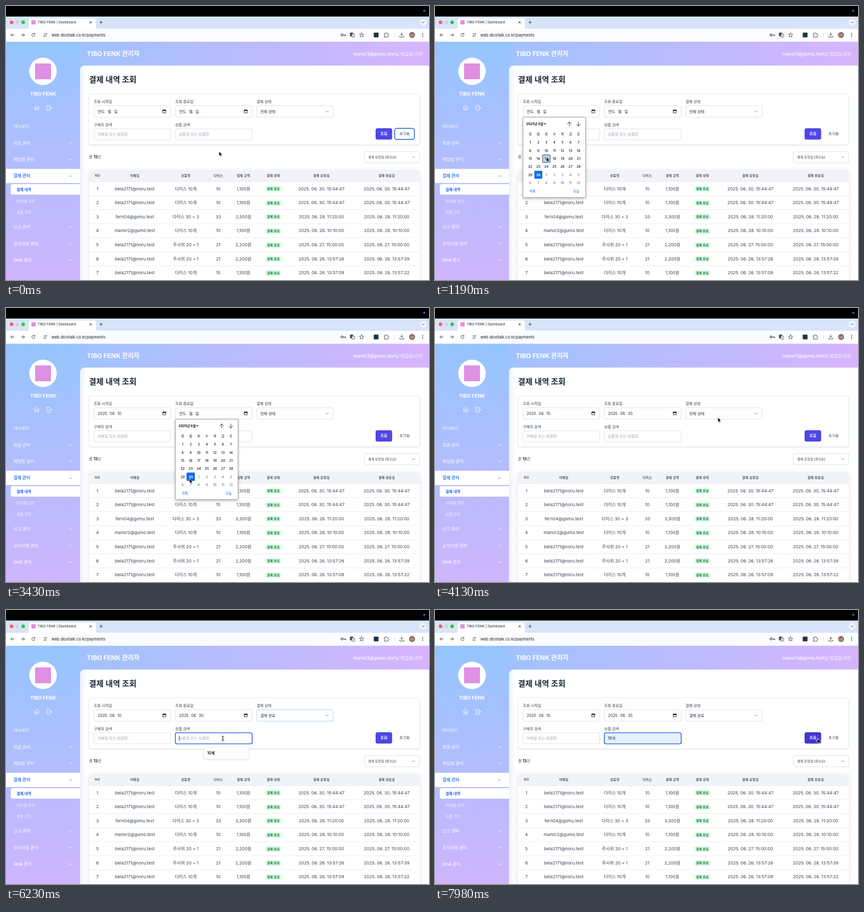
Recreate the animation shown at these times as an HTML page. Size 800x520 px, loop 8 s.

```html
<!DOCTYPE html>
<html lang="ko">
<head>
<meta charset="utf-8">
<title>Payments dashboard</title>
<style>
html, body { margin: 0; width: 100%; height: 100%; overflow: hidden; background: #fff; }
svg { display: block; width: 100vw; height: 100vh; }
text { font-family: Inter, 'Noto Sans CJK KR', 'Noto Sans CJK', sans-serif; white-space: pre; }
</style>
</head>
<body>
<svg id="stage" viewBox="0 0 800 520">
  <defs>
    <linearGradient id="top"><stop stop-color="#95c5fe"/><stop offset="1" stop-color="#d7b4fe"/></linearGradient>
    <linearGradient id="side" x2="0" y2="1"><stop stop-color="#95c5fe"/><stop offset="1" stop-color="#cfb5fe"/></linearGradient>
    <linearGradient id="edge"><stop stop-color="#edf1f8"/><stop offset="1" stop-color="#fff"/></linearGradient>
    <filter id="soft" x="-20%" y="-20%" width="140%" height="140%">
      <feDropShadow dx="0" dy="1" stdDeviation="1.2" flood-opacity=".14"/>
    </filter>
    <filter id="deep" x="-20%" y="-20%" width="140%" height="140%">
      <feDropShadow dx="0" dy="2" stdDeviation="2.5" flood-opacity=".28"/>
    </filter>
    <filter id="halo" x="-5%" y="-10%" width="110%" height="120%">
      <feDropShadow dx="0" dy="3" stdDeviation="4" flood-color="#334" flood-opacity=".12"/>
    </filter>
  </defs>
</svg>
<script>
const LOOP = 8000, STEP = 70;
const BRAND = 'TIBO FENK';
const INK = '#1f2937', BODY = '#374151', LINE = '#d1d5db', BLUE = '#2563eb';
const stage = document.getElementById('stage');

// Markup helpers; text is centred vertically on y
const attrs = o => Object.entries(o).map(([k, v]) => ` ${k}="${v}"`).join('');
const rect = (x, y, w, h, fill, o = {}) =>
  `<rect x="${x}" y="${y}" width="${w}" height="${h}" fill="${fill}"${attrs(o)}/>`;
const dot = (x, y, r, fill, o = {}) => `<circle cx="${x}" cy="${y}" r="${r}" fill="${fill}"${attrs(o)}/>`;
const path = (d, stroke, width = 1, o = {}) =>
  `<path d="${d}" fill="none" stroke="${stroke}" stroke-width="${width}" stroke-linecap="round" stroke-linejoin="round"${attrs(o)}/>`;
const text = (x, y, size, str, fill = BODY, weight = 400, o = {}) =>
  `<text x="${x}" y="${(y + size * .36).toFixed(2)}" font-size="${size}" fill="${fill}" font-weight="${weight}"${attrs(o)}>${str}</text>`;
const MID = { 'text-anchor': 'middle' };
const mid = (x, y, size, str, fill, weight, o = {}) => text(x, y, size, str, fill, weight, { ...MID, ...o });
const group = (id, body, o = {}) => `<g id="${id}"${attrs(o)}>${body}</g>`;
const chevron = (x, y, color, up = 1, s = 2.3) =>
  path(`M${x - s} ${y - up * s / 2}l${s} ${up * s}l${s} ${-up * s}`, color, .9);
const field = (x, y, w, h, o = {}) => rect(x, y, w, h, '#fff', { rx: 3, stroke: LINE, 'stroke-width': .7, ...o });

function browser() {
  const gray = '#474a4d';
  return rect(0, 0, 800, 20, '#000') + dot(791, 9, 2, '#5a4fe0') +
    rect(0, 20, 800, 24, '#d8e4fa') +
    dot(10.5, 31, 3.4, '#ff5f57') + dot(21.5, 31, 3.4, '#cfd2d8') + dot(32.5, 31, 3.4, '#2bc840') +
    `<path d="M39 43.5q4 0 4-4v-12q0-4 4-4h119q4 0 4 4v12q0 4 4 4z" fill="#fff"/>` +
    rect(48, 27, 8, 8, '#df90e2') +
    text(60, 31, 6.4, BRAND + ' | Dashboard', '#1f1f1f') +
    path('M158.2 29.2l3.8 3.8m0-3.8l-3.8 3.8', '#222', .9) +
    path('M177 31h5.6M179.8 28.2v5.6', '#333', .9) +
    dot(789, 31, 6.5, '#f1f5fd') + chevron(789, 31, '#333') +
    rect(0, 43.3, 800, 24.7, '#fff') + rect(67, 46, 613, 18, '#fafbfe', { rx: 9 }) +
    path('M15.4 55h-6m2.6-2.7l-2.7 2.7l2.7 2.7', gray, 1) +
    path('M29 55h6m-2.6-2.7l2.7 2.7l-2.7 2.7', gray, 1) +
    path('M54.3 53a3 3 0 1 0 .5 3M54.8 51.8v1.9h-1.9', gray, 1) +
    dot(74.5, 55, 6, '#fff') +
    path('M71.5 53h2.2M77 57h-2', gray, .9) +
    dot(76, 53, 1.1, 'none', { stroke: gray, 'stroke-width': .9 }) + dot(72.7, 57, 1.1, 'none', { stroke: gray, 'stroke-width': .9 }) +
    text(86, 55, 7.5, 'web.dicetalk.co.kr/payments', '#202124') +
    dot(635.4, 55, 1.9, 'none', { stroke: gray, 'stroke-width': 1.2 }) + path('M637.5 55h5v1.4m-1.9-1.2v1', gray, 1.2) +
    rect(650.5, 50.5, 6, 7, gray, { rx: 1 }) + rect(654, 53, 5.5, 6.5, '#fff', { rx: 1, stroke: gray, 'stroke-width': .7 }) +
    mid(656.8, 56.3, 4, '文', gray) +
    path('M672.5 50.8l1.2 2.7l2.9.3l-2.2 1.9l.7 2.9l-2.6-1.5l-2.6 1.5l.7-2.9l-2.2-1.9l2.9-.3z', gray, .9) +
    rect(695.5, 50.5, 9, 9, '#1d3440', { rx: 1 }) +
    path('M715.7 52.3h2.1q0-1.6 1.4-1.6t1.4 1.6h2v2.4q1.3 0 1.3 1.2t-1.3 1.2v2h-6.9v-2q1.5 0 1.5-1.3t-1.5-1.3z', gray, .95) +
    path('M735 51v8', '#c9d6ee', .8) +
    path('M748.5 50.8v5m-2.3-2.2l2.3 2.3l2.3-2.3M744.7 57v1.9h7.6V57', gray, 1) +
    dot(768, 55, 5.7, '#8d6a60') + mid(768, 55, 4.3, '나루', '#fff') +
    [52, 55, 58].map(y => dot(788, y, .9, gray)).join('') +
    rect(0, 67.3, 800, .7, '#e6eaf2');
}

function sidebar() {
  const items = [['대시보드', 228.5], ['회원 관리', 260], ['채팅방 관리', 291], ['신고 관리', 419.5], ['공지사항 관리', 451], ['QnA 관리', 482.5]];
  return rect(0, 68, 800, 90, 'url(#top)') + rect(0, 68, 140, 452, 'url(#side)') +
    text(153, 90.5, 12, BRAND + ' 관리자', '#fff', 700) +
    text(787, 90.5, 8.4, 'manor3@gomu.test님 반갑습니다!', '#fff', 500, { 'text-anchor': 'end' }) +
    dot(70, 124, 26, '#fff') + rect(55, 109, 30, 30, '#df90e2') +
    mid(70, 167, 9.3, BRAND, '#fff', 700) +
    path('M53.3 193l4.7-4.6l4.7 4.6M54.5 192v5.2h2.4v-3.4h2.2v3.4h2.4V192', '#fff', .85) +
    path('M83.3 190.6v-2h-6v9.2h6v-2M80.5 193.2h6m-2-2l2 2l-2 2', '#fff', .85) +
    items.map(([s, y], i) => text(14, y, 8.2, s, '#fff', 500) + (i ? chevron(122, y, '#fff') : '')).join('') +
    rect(0, 309, 140, 27, '#fff') + text(14, 322.5, 8.2, '결제 관리', '#3b82f6', 700) + chevron(122, 322.8, '#3b82f6', -1) +
    rect(9, 338, 134, 20, '#fff', { rx: 3.5 }) + text(20, 348, 7.1, '결제 내역', BLUE, 700) +
    text(20, 370, 7.1, '아이템 관리', '#f5f3ff') + text(20, 391.5, 7.1, '상품 관리', '#f5f3ff');
}

function filters() {
  const label = (x, y, s) => text(x, y, 7.1, s, BODY, 500);
  const dateBox = (x, id) => field(x, 189.3, 145.3, 21.7) +
    `<g id="${id}"></g>` +
    rect(x + 130.3, 197.6, 5.6, 5.2, 'none', { stroke: '#111', 'stroke-width': .8 }) +
    rect(x + 129.9, 197.2, 6.4, 1.9, '#111') + path(`M${x + 131.4} 196.6v.6m3.4-.6v.6`, '#111', .7);
  return '<path d="M140 520V123q0-10 10-10h650v407z" fill="#fff"/>' +
    '<path d="M140 520V123q0-10 10-10h2v407z" fill="url(#edge)"/>' +
    text(157, 140, 15, '결제 내역 조회', INK, 700) +
    rect(157, 167, 625.5, 96, '#fff', { rx: 4, stroke: '#e5e7eb', 'stroke-width': .7, filter: 'url(#soft)' }) +
    label(166, 181.5, '조회 시작일') + label(320, 181.5, '조회 종료일') + label(474, 181.5, '결제 상태') +
    label(166, 225.5, '구매자 검색') + label(320, 225.5, '상품 검색') +
    dateBox(166.3, 'from') + dateBox(320.3, 'to') +
    field(474.3, 189.3, 144.4, 21.7, { id: 'status' }) + '<g id="statusText"></g>' + chevron(607.5, 200.2, '#6b7280') +
    field(166.3, 233, 145.3, 21) + text(173, 243.5, 7.2, '이메일 또는 회원ID', '#9ca3af') +
    field(320.3, 233, 145.3, 21, { id: 'product' }) + '<g id="productText"></g>' +
    rect(327.2, 238.7, .7, 9.6, '#111', { id: 'caret' }) +
    rect(699, 232, 31.3, 21.6, '#4f46e5', { rx: 3.5, id: 'search' }) + mid(714.6, 242.7, 7.1, '조회', '#fff', 600) +
    rect(735.2, 232.3, 37.2, 21, '#fff', { rx: 3.5, stroke: '#1967c9', 'stroke-width': 1.5, id: 'resetRing' }) +
    mid(753.8, 242.7, 7.1, '초기화', BODY, 500) +
    text(157, 286.7, 7.2, '총 <tspan font-weight="700" fill="#111827">13</tspan>건') +
    field(678, 276.2, 104.2, 21.4) + text(685, 287, 6.2, '결제 요청일 (최신순)', BODY, 500) + chevron(771, 287, '#6b7280');
}

function table() {
  const cols = [173, 243.5, 340, 401.5, 449, 505.5, 596.5, 720];
  const heads = ['NO', '이메일', '상품명', '다이스', '결제 금액', '결제 상태', '결제 요청일', '결제 완료일'];
  const mail = 'bela2171@noru.test', ten = ['다이스 10개', 10, '1,100원'], twenty = ['주사위 20 + 1', 21, '2,200원'];
  const rows = [
    [mail, ten, '30. 15:44:47'], [mail, ten, '30. 15:44:47'],
    ['fern04@gomu.test', ['다이스 30 + 3', 33, '3,300원'], '28. 11:20:00'],
    ['manor2@gumo.test', ten, '28. 10:10:00'], [mail, twenty, '27. 15:00:00'],
    [mail, twenty, '26. 13:57:26', '26. 13:57:39'], [mail, ten, '26. 13:57:09', '26. 13:57:22']
  ];
  return rect(157, 311, 625.5, 230, '#fff', { rx: 5, filter: 'url(#halo)' }) +
    '<path d="M157 333v-17q0-5 5-5h615.500q5 0 5 5v17z" fill="#f2f3f7"/>' +
    heads.map((s, i) => mid(cols[i], 322, 6.1, s, '#4b5563', 600, { 'letter-spacing': .25 })).join('') +
    rows.map(([who, item, asked, done = asked], n) => {
      const y = 346.6 + n * 26.63;
      const cells = [n + 1, who, ...item, null, '2025. 06. ' + asked, '2025. 06. ' + done];
      return rect(157, y - 13.6, 625.5, .7, '#e5e7eb') +
        rect(489.2, y - 4.9, 32.8, 10.6, '#dcfce7', { rx: 5.3 }) +
        cells.map((s, i) => i === 5
          ? mid(505.6, y + .4, 6.2, '결제 완료', '#15803d', 600)
          : mid(cols[i], y, 8.2, s)).join('');
    }).join('');
}

function calendar() {
  const X = i => 13.8 + i * 15.25, Y = r => 259.2 + r * 15.27;
  let days = '';
  for (let n = 0; n < 42; n++) {
    const day = n % 30 + 1, today = n === 29;
    const x = X(n % 7), y = Y(Math.floor(n / 7));
    if (today) days += rect(x - 7.5, y - 7.5, 15, 15, '#0b6cf0', { rx: 1 });
    days += mid(x, y, 6.3, day, today ? '#fff' : n < 30 ? '#111' : '#757575', today ? 700 : 500);
  }
  return rect(0, 211, 118.6, 152.6, '#fff', { rx: 2, stroke: '#777', 'stroke-width': .7, filter: 'url(#deep)' }) +
    text(6, 223.5, 6.2, '2025년 6월', '#111', 700) + '<path d="M39.300 222.500h4.400l-2.200 2.600z" fill="#111"/>' +
    path('M87.700 228v-8m-3.700 3.700l3.700-3.700l3.700 3.700M105 220v8m-3.700-3.700l3.700 3.700l3.700-3.700', '#222', .9) +
    [...'일월화수목금토'].map((s, i) => mid(X(i), 243.3, 6, s, '#111', 500)).join('') +
    rect(0, 0, 14.6, 14.6, '#bcd0f3', { id: 'dayHover', rx: 1, stroke: '#24364f', 'stroke-width': .9 }) + days +
    text(12, 352, 6.3, '삭제', '#1266e3', 500) + text(95, 352, 6.3, '오늘', '#1266e3', 500);
}

function popups() {
  const options = ['전체 상태', '결제 완료', '결제 실패', '결제 취소', '환불 완료', '결제 대기'];
  return group('calendar', calendar()) +
    group('menu', rect(474, 213.5, 146, 109.5, '#fff', { rx: 3.5, stroke: '#e2e4e9', 'stroke-width': .6, filter: 'url(#deep)' }) +
      rect(476.5, 0, 141, 17.2, '#f3f4f6', { id: 'menuHover', rx: 2 }) +
      path('M482 224.800l1.800 1.900l4-4.300', '#111', .9) +
      options.map((s, i) => text(494, 224.7 + i * 17.35, 7.2, s, INK, 500)).join('')) +
    group('hint', rect(373.4, 260.8, 86, 22.2, '#fff', { rx: 3, stroke: '#dadce0', 'stroke-width': .5, filter: 'url(#soft)' }) +
      rect(374, 263, 84.8, 17.5, '#eceef1', { id: 'hintHover' }) + text(380.5, 271, 7, '10개', '#111', 600));
}

function cursors() {
  const arrow = '<path d="M0 0v8.800l2-1.900l1.400 3.200l1.500-.7l-1.400-3.100h2.800z" fill="#000" stroke="#fff" stroke-width=".7"/>';
  const beam = path('M-1.800-4.500q1.800 0 1.800 1.200v6.600q0 1.200-1.800 1.200M1.800-4.500q-1.800 0-1.800 1.200m0 6.600q0 1.200 1.800 1.200M-1 .8h2', '#111', .9);
  const hand = '<path d="M-.8 0q.8-.9 1.600 0v3.400l3 .7q1 .3.900 1.400l-.5 3.300h-4.600l-2.300-3.400q-.2-1.100.8-.9l1.100 1z" fill="#111" stroke="#fff" stroke-width=".7"/>';
  return group('pointer', group('arrow', arrow) + group('beam', beam) + group('hand', hand));
}

stage.insertAdjacentHTML('beforeend',
  browser() + sidebar() + filters() + table() + popups() + cursors());

const el = {};
stage.querySelectorAll('[id]').forEach(n => el[n.id] = n);
const show = (id, on) => el[id].setAttribute('visibility', on ? 'inherit' : 'hidden');
const set = (id, o) => { for (const k in o) el[id].setAttribute(k, o[k]); };
const clamp = v => Math.max(0, Math.min(1, v));
const mix = (a, b, k) => `rgb(${a.map((v, i) => Math.round(v + (b[i] - v) * k))})`;

// Moves: start time, end time, x, y
const moves = [
  [70, 560, 299, 200], [700, 1190, 211, 287], [1260, 1400, 210, 275],
  [1540, 2450, 453, 200], [2660, 3360, 347, 324], [3710, 4200, 546, 201],
  [4400, 5040, 528, 241], [5460, 6020, 410, 244], [6370, 6790, 392, 271],
  [7280, 7700, 722, 243], [7840, 7980, 724, 243]
];
const CLICK = { open1: 630, pick1: 1470, open2: 2520, pick2: 3570, menu: 4270, option: 5320, focus: 6160, fill: 7140 };

function pointerAt(t) {
  let x = 403, y = 276;
  for (const [a, b, tx, ty] of moves) {
    if (t < a) break;
    const k = clamp((t - a) / (b - a)), e = k * k * (3 - 2 * k);
    x += (tx - x) * e;
    y += (ty - y) * e;
  }
  return [x, y];
}

function draw(t) {
  const c = CLICK, [x, y] = pointerAt(t);
  const within = (a, b) => t >= a && t < b;
  const inside = (l, top, r, b) => x > l && x < r && y > top && y < b;
  const date = (id, left, value) => el[id].innerHTML =
    text(left, 200.2, 7.2, value || '연도. 월. 일.', INK, 400, { 'word-spacing': 1.4 });

  date('from', 173.5, t >= c.pick1 && '2025. 06. 10.');
  date('to', 327.5, t >= c.pick2 && '2025. 06. 30.');
  show('resetRing', t < c.open1);

  const first = within(c.open1, c.pick1), second = within(c.open2, c.pick2);
  const left = first ? 166.3 : 320.3;
  show('calendar', first || second);
  set('calendar', { transform: `translate(${left} 0)` });
  const col = Math.floor((x - left - 6.2) / 15.25), row = Math.floor((y - 251.6) / 15.27);
  show('dayHover', (first || second) && col >= 0 && col < 7 && row >= 0 && row < 6);
  set('dayHover', { x: 6.5 + col * 15.25, y: 251.9 + row * 15.27 });

  show('menu', within(c.menu, c.option));
  const option = Math.max(0, Math.floor((y - 216) / 17.35));
  set('menuHover', { y: 216.1 + option * 17.35 });
  el.statusText.innerHTML = text(481, 200.2, 7.2, t < c.option ? '전체 상태' : '결제 완료', INK, 500);
  const glow = t < c.option ? 0 : 1 - clamp((t - c.focus) / 150);
  set('status', { stroke: mix([209, 213, 219], [96, 165, 250], glow) });

  const focused = t >= c.focus, onHint = within(c.focus, c.fill) && inside(373, 261, 459, 283);
  const filled = t >= c.fill || onHint;
  set('product', {
    stroke: focused ? '#3b72e0' : LINE, 'stroke-width': focused ? 1.7 : .7,
    fill: filled ? '#e8f0fe' : '#fff'
  });
  el.productText.innerHTML = filled
    ? text(327, 243.5, 7.2, '10개', INK, 500)
    : text(327, 243.5, 7.2, '상품명 또는 상품ID', '#9ca3af');
  show('caret', focused && !filled && (t - c.focus) % 1000 < 500);
  show('hint', within(c.focus, c.fill));
  show('hintHover', onHint);

  const onSearch = inside(699, 232, 730, 254);
  set('search', { fill: onSearch ? '#4338ca' : '#4f46e5' });
  const onInput = !first && !second && (inside(320, 233, 466, 254) || inside(166, 233, 312, 254));
  show('beam', onInput);
  show('hand', onSearch);
  show('arrow', !onInput && !onSearch);
  set('pointer', { transform: `translate(${x.toFixed(2)} ${y.toFixed(2)})` });
}

function tick() {
  const t = performance.now() % LOOP;
  draw(Math.floor(t / STEP) * STEP);
  requestAnimationFrame(tick);
}
tick();
</script>
</body>
</html>
```
